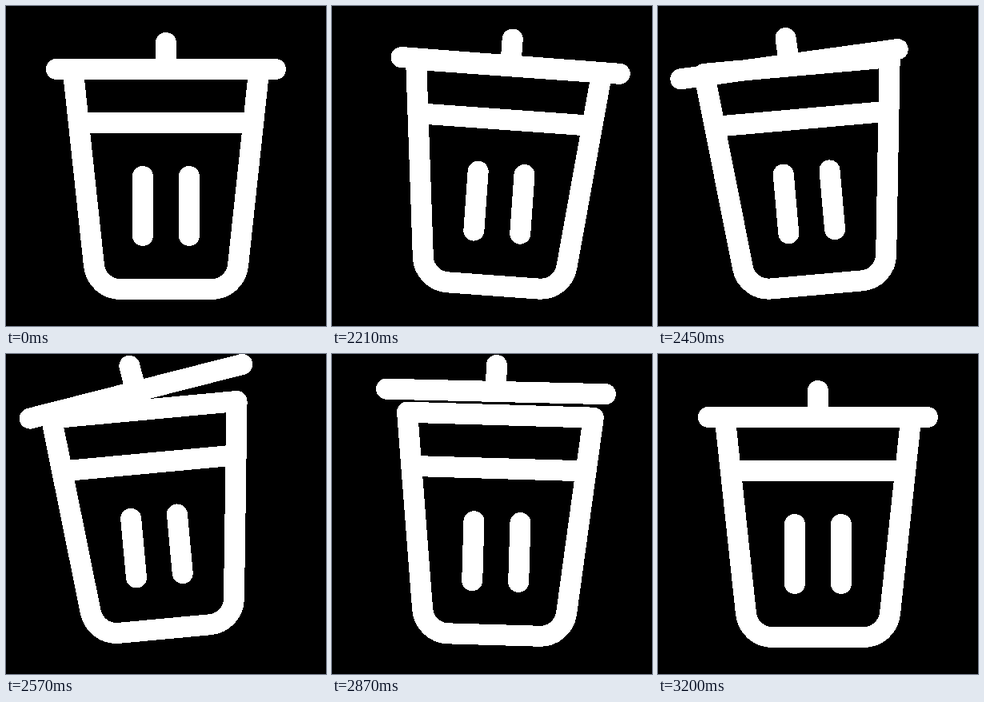
An HTML page for the animation above (3260 ms loop, 400x400 px).

```html
<!DOCTYPE html>
<html lang="en">
<head>
<meta charset="utf-8">
<title>Bin</title>
<style>
  html, body { margin: 0; width: 100%; height: 100%; overflow: hidden; background: #000; }
  svg { display: block; width: 100%; height: 100%; }
  path {
    fill: none; stroke: #fff; stroke-width: 26;
    stroke-linecap: round; stroke-linejoin: round;
    shape-rendering: crispEdges;
  }
</style>
</head>
<body>
<svg viewBox="0 0 400 400">
  <g id="bin">
    <path d="M83.6 79L110 324.5A33 33 0 0 0 142.8 354H257.2A33 33 0 0 0 290 324.5L316.4 79Z"/>
    <path d="M91 146H309M171 213V287M229 213V287"/>
  </g>
  <g id="lid">
    <path d="M63 79H337M200 46V79"/>
  </g>
</svg>
<script>
const LOOP = 3260, START = 2030, END = 3200, STEP = 30;
const FOOT = 64; // half the width the bin rocks on
const bin = document.getElementById('bin');
const lid = document.getElementById('lid');

// Turning points [time, value] of each pendulum-like swing
const binTilt = [[2015, 0], [2210, 4.1], [2508, -6], [2836, 2.2], [3010, -3.2], [END, 0]];
const lidTilt = [[START, 0], [2265, 5], [2570, -14.3], [2770, 3.1], [3010, -1.6], [END, 0]];
const lidShift = [[2015, 0], [2236, 24], [2502, -42], [2844, 6], [3005, -9.8], [END, 0]];

function swing(t, turns) {
  const i = turns.findIndex(([time]) => time > t);
  if (i < 1) return 0;
  const [t0, a] = turns[i - 1], [t1, b] = turns[i];
  return a + (b - a) * (1 - Math.cos(Math.PI * (t - t0) / (t1 - t0))) / 2;
}

// Parabolic flight from t0 to t1
function jump(t, t0, t1, height) {
  const u = (t - t0) / (t1 - t0);
  return u > 0 && u < 1 ? 4 * height * u * (1 - u) : 0;
}

function place(part, x, y, angle, pivotY) {
  part.setAttribute('transform',
    `translate(${x.toFixed(3)} ${y.toFixed(3)}) rotate(${angle.toFixed(3)} 200 ${pivotY})`);
}

function draw(time) {
  const now = time % LOOP;
  const t = now < START ? 0 : START + Math.floor((now - START) / STEP) * STEP;

  const tilt = swing(t, binTilt);
  const rock = FOOT * Math.sin(Math.abs(tilt) * Math.PI / 180);
  const hop = jump(t, 2520, 2880, 9.7);
  const slide = jump(t, 2836, END, 4.7);
  place(bin, slide, -rock - hop, tilt, 375);

  const toss = jump(t, 2210, 2465, 3) + jump(t, 2465, 2997, 41.5) + jump(t, 2997, END, 6);
  place(lid, swing(t, lidShift), -rock - toss, swing(t, lidTilt), 79);
}

let origin;
function tick(now) {
  origin ??= now;
  draw(Math.max(0, now - origin));
  requestAnimationFrame(tick);
}
draw(0);
requestAnimationFrame(tick);
</script>
</body>
</html>
```
